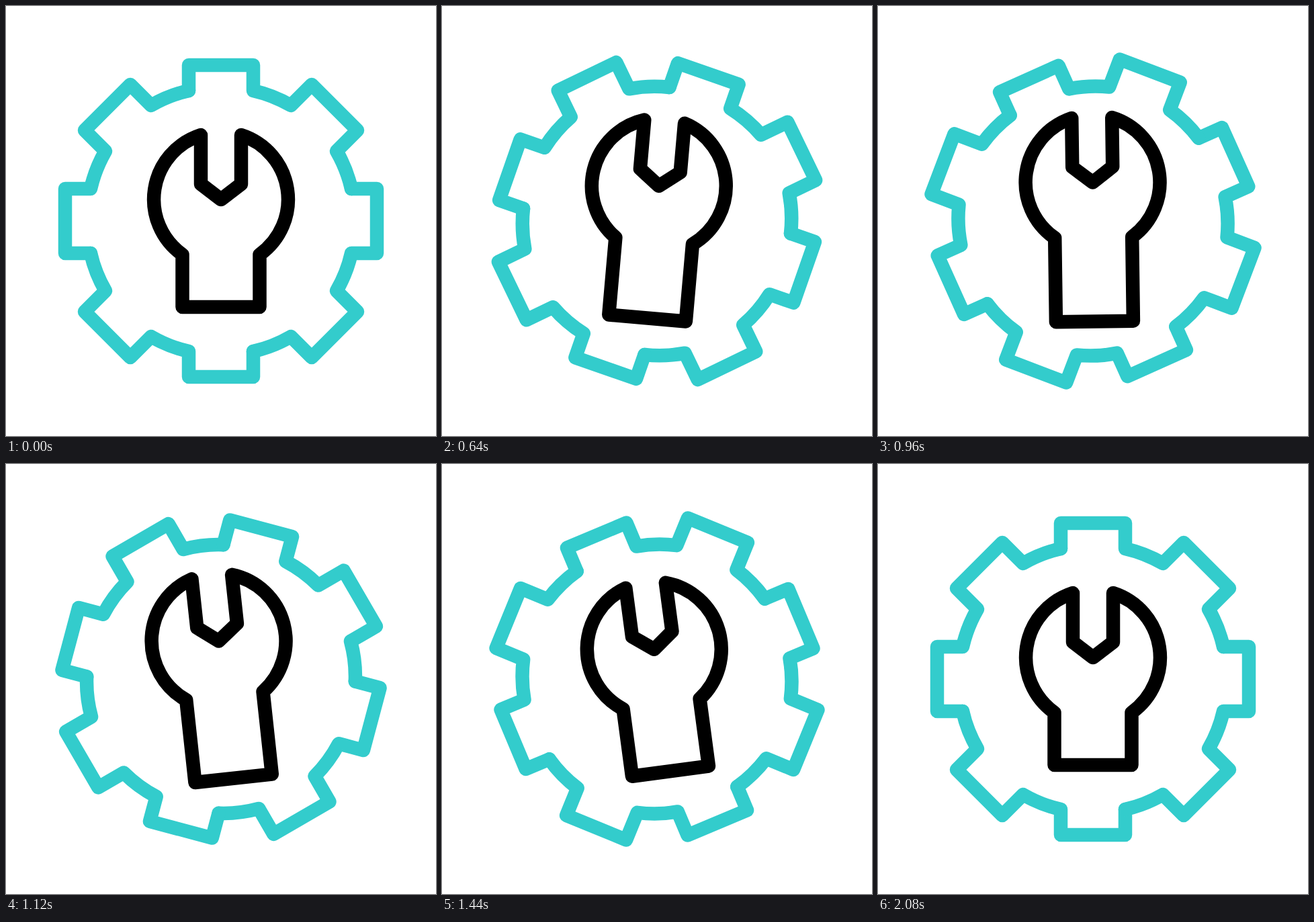
Recreate the animation shown at these times as an HTML page. Size 640 by 640 pixels, loop 2160 ms.

```html
<!DOCTYPE html>
<html lang="en">
<head>
<meta charset="utf-8">
<title>Gear and wrench</title>
<style>
  html, body { margin: 0; height: 100%; overflow: hidden; background: #fff; }
  svg { display: block; width: 100vw; height: 100vh; }
  path { fill: none; stroke-width: 20.5; stroke-linecap: round; stroke-linejoin: round; }
</style>
</head>
<body>
<svg viewBox="-320 -320 640 640">
  <g id="gear" stroke="#3cc">
    <path id="quarter" d="M-48-194V-232H48V-194A200 200 0 0 1 104-172L135-203 203-135 172-104A200 200 0 0 1 194-48"/>
    <use href="#quarter" transform="rotate(90)"/>
    <use href="#quarter" transform="rotate(180)"/>
    <use href="#quarter" transform="rotate(270)"/>
  </g>
  <path id="wrench" stroke="#000"/>
</svg>
<script>
const LOOP = 2160, STEP = 40;
const gear = document.getElementById('gear');
const wrench = document.getElementById('wrench');

const progress = (t, from, to) => Math.min(1, Math.max(0, (t - from) / (to - from)));

const smooth = (t, from, to) => {
  const s = progress(t, from, to);
  return s * s * (3 - 2 * s);
};

// Cubic bezier (a, 0, 1 - a, 1), solved by bisection
function steep(x, a) {
  let lo = 0, hi = 1;
  for (let i = 0; i < 30; i++) {
    const s = (lo + hi) / 2, r = 1 - s;
    if (3 * s * r * r * a + 3 * s * s * r * (1 - a) + s ** 3 < x) lo = s;
    else hi = s;
  }
  return lo * lo * (3 - 2 * lo);
}

function draw(t) {
  const spin = 180 * steep(progress(t, 40, 2080), 0.65);
  const stretch = 47 * (smooth(t, 73, 873) - smooth(t, 1033, 1833));
  const tilt = 5.1 * smooth(t, 90, 690) - 14.1 * smooth(t, 693, 1293) + 9 * smooth(t, 1290, 1890);

  gear.setAttribute('transform', `rotate(${spin})`);
  wrench.setAttribute('transform', `translate(0 ${-0.543 * stretch}) rotate(${tilt})`);
  wrench.setAttribute('d', `M-57.5 50A100.7 100.7 0 0 1-30-128V-55L0-32 30-55V-128
    A100.7 100.7 0 0 1 57.5 50V${128 + stretch}H-57.5Z`);
}

function tick() {
  const t = performance.now() % LOOP;
  draw(Math.floor(t / STEP) * STEP);
  requestAnimationFrame(tick);
}
tick();
</script>
</body>
</html>
```
